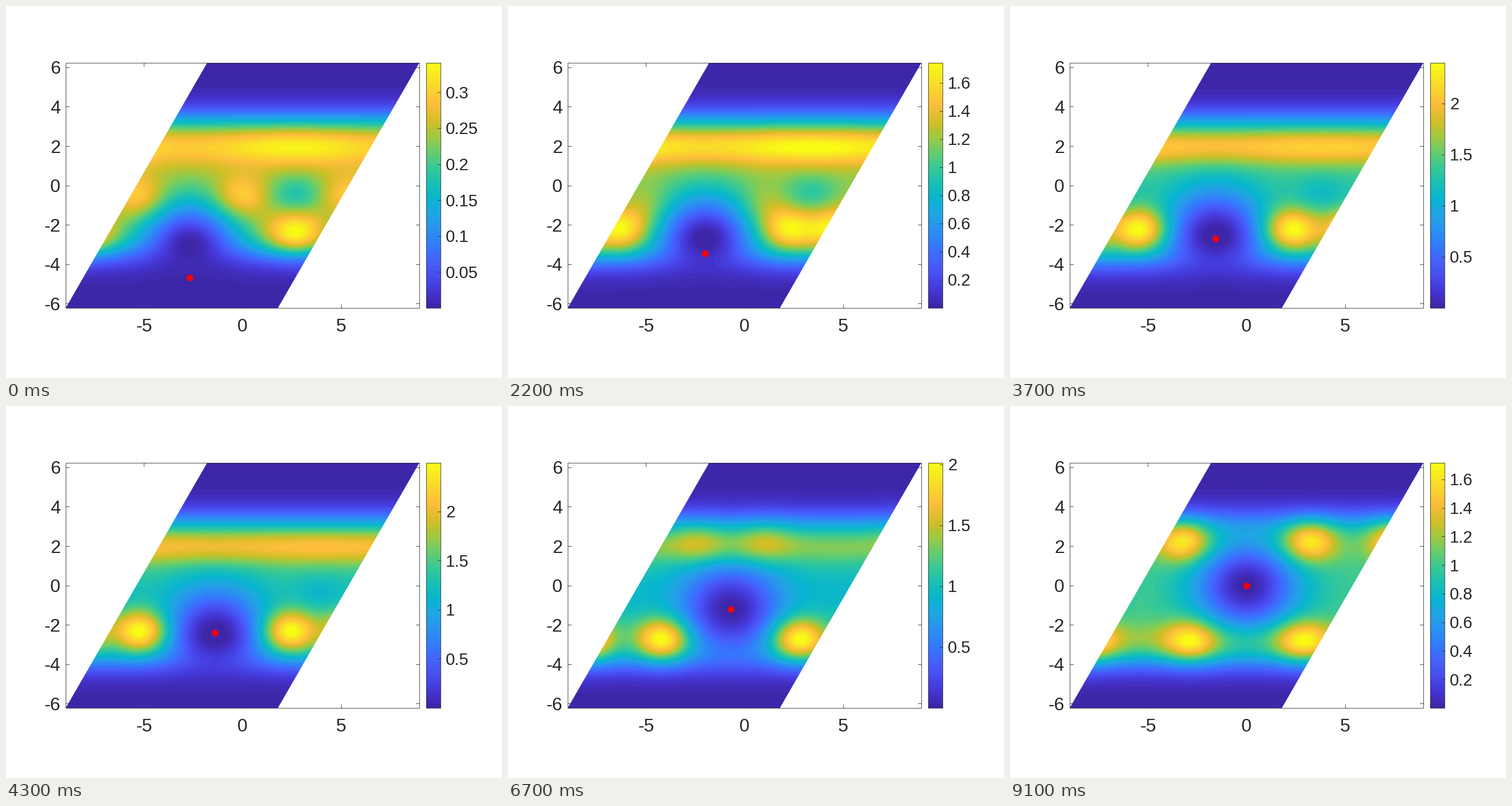
A matplotlib script that plays this animation: 864 px wide and 648 px high, repeating every 9400 ms.

```python
import numpy as np
import matplotlib.pyplot as plt
from matplotlib.animation import FuncAnimation
from matplotlib.colors import LinearSegmentedColormap
from matplotlib.patches import Polygon, Rectangle

W, H = 864, 648
LEFT, RIGHT, TOP, BOTTOM = 104, 720, 99, 526
BAR_L, BAR_R = 732, 757
CX, CY = (LEFT + RIGHT) / 2, (TOP + BOTTOM) / 2
A = np.sqrt(4 * np.pi / np.sqrt(3))      # lattice constant
PERIOD = 4 * A
HALF_X, HALF_Y = 10 * A / 3, 4 * A / np.sqrt(3)
SX, SY = (RIGHT - LEFT) / 2 / HALF_X, (BOTTOM - TOP) / 2 / HALF_Y
INK = "#262626"
STEPS = 31

# Parula: blue through teal and orange to yellow.
STOPS = [(0, "#3e26a8"), (4, "#4537d5"), (8, "#484df0"), (12, "#4563fd"),
         (16, "#327cfc"), (20, "#2b91ef"), (24, "#20a5e3"), (28, "#08b5d0"),
         (32, "#19bfb6"), (36, "#37c897"), (40, "#64cd6f"), (44, "#9dc943"),
         (48, "#d1bf27"), (53, "#febe3c"), (57, "#fad62d"), (63, "#f9fb15")]
CMAP = LinearSegmentedColormap.from_list(
    "density", [(i / 63, c) for i, c in STOPS], N=64)

X, Y = np.meshgrid(np.linspace(-HALF_X, HALF_X, RIGHT - LEFT),
                   np.linspace(HALF_Y, -HALF_Y, BOTTOM - TOP))


def track(k, *points):
    """Smooth curve through a few (step, value) points."""
    x, v = np.array(points, float).T
    k = np.clip(k, x[0], x[-1])
    slope = np.gradient(v, x)
    i = min(np.searchsorted(x, k, "right") - 1, len(x) - 2)
    h = x[i + 1] - x[i]
    t = (k - x[i]) / h
    s = t * t * (3 - 2 * t)
    return (v[i] * (1 - s) + v[i + 1] * s
            + h * t * (1 - t) * ((1 - t) * slope[i] - t * slope[i + 1]))


def bell(d, width):
    return np.exp(-(d / width) ** 2 / 2)


def step_up(d):
    return 1 / (1 + np.exp(-d / .42))


def pair(u, at, y, wu=.95, wy=.75):
    """Two bumps at equal distances left and right of the probe."""
    sides = bell(u - at, wu) + bell(u + at, wu) + bell(PERIOD - u - at, wu)
    return sides * bell(Y - y, wy)


def probe(k):
    left = 1 - k / STEPS
    return -A * left, -np.sqrt(3) * A * left


def density(k):
    px, py = probe(k)
    p = k / STEPS
    u = np.abs((X - px + PERIOD / 2) % PERIOD - PERIOD / 2)
    wave = np.cos(2 * np.pi * u / PERIOD)

    # Plateau with soft edges, a dent opposite the probe and a hole around it
    level = track(k, (0, .74), (5, .72), (15, .57), (23, .52), (31, .62))
    low_edge = track(k, (0, -3.4), (15, -3.95), (31, -3.95))
    plateau = level * step_up(3.4 - Y) * step_up(Y - low_edge)
    dent = .22 * (1 - p) * bell(u - PERIOD / 2, 1.1) * bell(Y + .45, .75)
    hole = bell(u, 1.9) * bell(Y - max(py, .3 * py - 1.68), 1.7)

    # Continuous rows
    top = track(k, (0, .2), (15, .28), (23, .18), (27, .12), (31, .03))
    low = track(k, (0, 0), (23, 0), (27, .03), (31, .12))
    rows = (top * (1 - .25 * (1 - 1.8 * p) * wave) * bell(Y - 2, .65)
            + low * bell(Y + 2.8, .65))

    # Neighbours of the probe
    low_u = track(k, (0, 5), (10, 4), (17, 3.65), (27, 3.25), (31, 2.85))
    low_y = track(k, (0, -2.5), (11, -2.25), (23, -2.75), (31, -2.85))
    low_amp = track(k, (0, .18), (5, .25), (15, .53), (23, .57), (31, .4))
    top_u = track(k, (15, 0), (23, 1.7), (27, 2.85), (31, 3.2))
    top_amp = track(k, (15, 0), (23, .14), (27, .36), (31, .45))
    arm_amp = .22 * max(0, 1 - p / .45)
    bumps = (low_amp * pair(u, low_u, low_y)
             + top_amp * pair(u, top_u, 2.25)
             + arm_amp * pair(u, 2.6 + 1.5 * p, -.6 - 1.8 * p))

    field = (plateau - dent) * (1 - hole) + rows + bumps
    return np.clip(field / field.max(), 0, 1)


def peak_value(k):
    return track(k, (0, .341), (5, 1.145), (10, 2.086), (15, 2.495),
                 (23, 2.013), (27, 1.725), (31, 1.716))


def tick_step(peak):
    return next(s for s in (.05, .1, .2, .5, 1) if peak / s <= 9.2)


fig = plt.figure(figsize=(W / 72, H / 72), dpi=72, facecolor="white")
ax = fig.add_axes([0, 0, 1, 1])
ax.axis("off")


def line(x, y, z=1):
    return ax.plot(x, y, color=INK, lw=.8, zorder=z)[0]


def label(x, y, s, ha, size):
    return ax.text(x, y + .35 * size, s, ha=ha, va="baseline", fontsize=size,
                   color=INK, family="Liberation Sans")


def frame_box(x0, x1):
    ax.add_patch(Rectangle((x0, TOP), x1 - x0, BOTTOM - TOP, fc="none",
                           ec=INK, lw=.8, zorder=4))


for v in (-5, 0, 5):
    x = CX + v * SX
    line([x, x], [TOP, TOP + 6])
    line([x, x], [BOTTOM, BOTTOM - 6])
    label(x, 555.5, str(v), "center", 32)
for v in range(-6, 7, 2):
    y = CY - v * SY
    line([LEFT, LEFT + 6], [y, y])
    line([RIGHT, RIGHT - 6], [y, y])
    label(95, y + .5, str(v), "right", 32)

cell = ax.add_patch(Polygon(
    [(LEFT, BOTTOM), (LEFT + PERIOD * SX, BOTTOM), (RIGHT, TOP),
     (RIGHT - PERIOD * SX, TOP)], fc="none", ec="none"))
style = dict(cmap=CMAP, vmin=0, vmax=1, aspect="auto", zorder=2,
             interpolation="nearest")
image = ax.imshow(density(0), extent=(LEFT, RIGHT, BOTTOM, TOP), **style)
image.set_clip_path(cell)
ax.imshow(np.linspace(1, 0, BOTTOM - TOP)[:, None],
          extent=(BAR_L, BAR_R, BOTTOM, TOP), **style)
frame_box(LEFT, RIGHT)
frame_box(BAR_L, BAR_R)
dot, = ax.plot([], [], "o", color="red", ms=11.5, mew=0, zorder=5)
bar_ticks = [(line([], [], 5), label(766, 0, "", "left", 29))
             for _ in range(10)]
ax.set_xlim(0, W)
ax.set_ylim(H, 0)


def draw(i):
    k = (i + 2) // 3
    image.set_data(density(k))
    px, py = probe(k)
    dot.set_data([CX + px * SX], [CY - py * SY])
    peak = peak_value(k)
    step = tick_step(peak)
    for n, (mark, text) in enumerate(bar_ticks, 1):
        v = n * step
        shown = v <= peak
        mark.set_visible(shown)
        text.set_visible(shown)
        if shown:
            y = BOTTOM - v / peak * (BOTTOM - TOP)
            mark.set_data([BAR_R - 5, BAR_R], [y, y])
            text.set_text(f"{v:.3g}")
            text.set_y(y + 10.5)
    return []


anim = FuncAnimation(fig, draw, frames=94, interval=100, repeat=True,
                     repeat_delay=0, blit=False)
plt.show()
```
